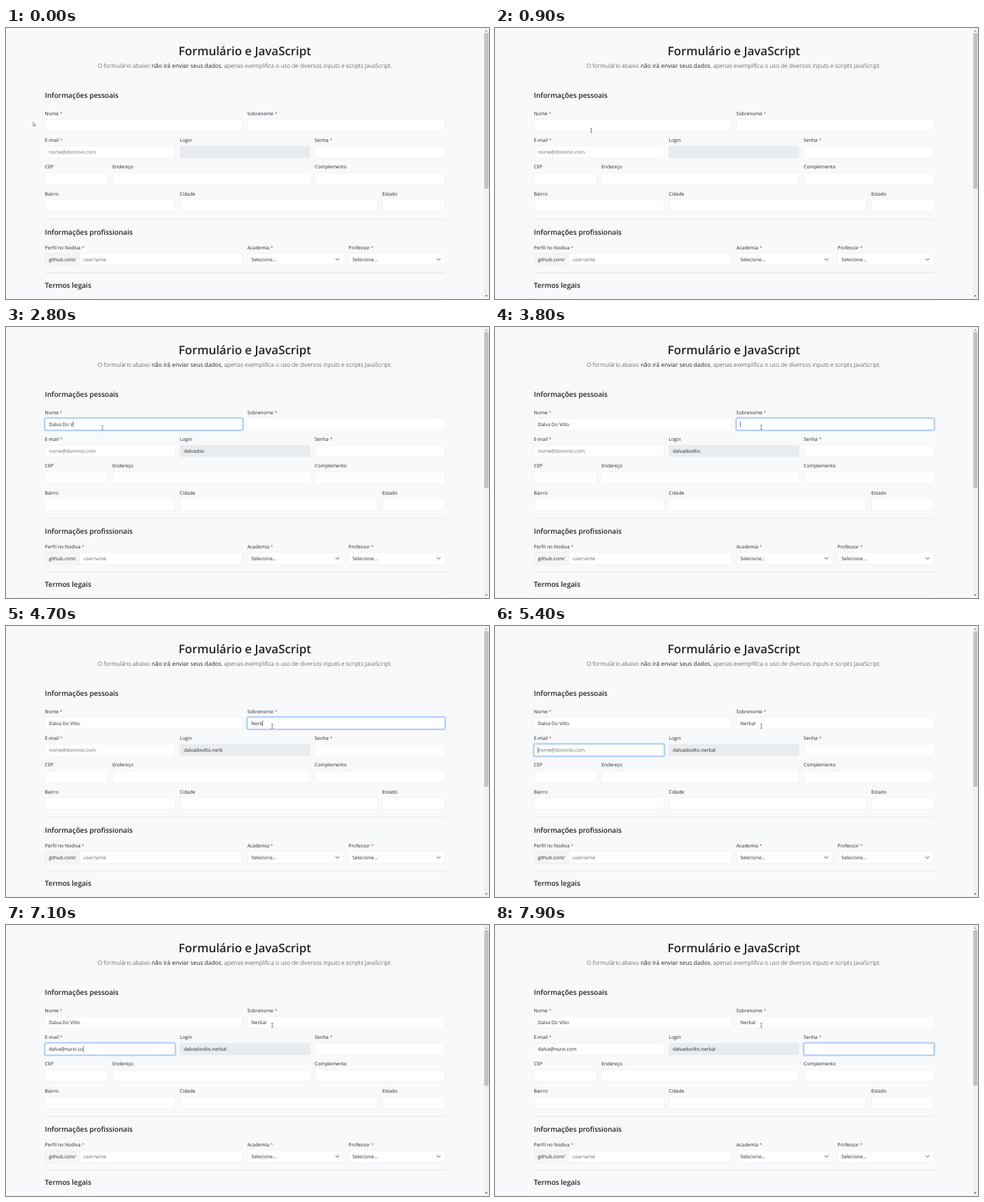
Write an HTML page that moves like this. It is 690x388 px and loops after 8 s.

```html
<!DOCTYPE html>
<html lang="pt-BR">
<head>
<meta charset="utf-8">
<title>Formulário e JavaScript</title>
<style>
  html, body { margin: 0; width: 100%; height: 100%; overflow: hidden; background: #f8f9fa; }
  svg { display: block; width: 690px; height: 388px; }
  text {
    font: 400 6.85px "Open Sans", "Noto Sans", sans-serif;
    fill: #212529; text-rendering: geometricPrecision; white-space: pre;
  }
  .title { font-size: 17px; font-weight: 600; letter-spacing: -.05px; text-anchor: middle; }
  .lead { font-size: 8.4px; font-weight: 300; text-anchor: middle; }
  .strong { font-weight: 400; }
  .section { font-size: 10.2px; font-weight: 600; letter-spacing: -.06px; }
  .hint { fill: #5f676e; }
  .star { fill: #a8656b; }
  .field { fill: #fff; stroke: #e6e9ec; stroke-width: .5; }
  .gray { fill: #e9ecef; }
  .addon { fill: #f3f5f6; }
  .ring { fill: none; stroke: #0d6efd; stroke-opacity: .25; stroke-width: 1.8; }
  .edge { fill: none; stroke: #86b7fe; stroke-width: .6; }
  .rule { stroke: #dfe2e4; stroke-width: .9; }
  .chevron { fill: none; stroke: #343a40; stroke-width: .9; stroke-linecap: round; stroke-linejoin: round; }
</style>
</head>
<body>
<svg id="stage" viewBox="0 0 690 388">
  <text class="title" x="341.3" y="39.4">Formulário e JavaScript</text>
  <text class="lead" x="341" y="57.2">O formulário abaixo <tspan class="strong">não irá enviar seus dados</tspan>, apenas exemplifica o uso de diversos inputs e scripts JavaScript.</text>
  <text class="section" x="55.6" y="99.6">Informações pessoais</text>
  <text class="section" x="55.6" y="295.5">Informações profissionais</text>
  <text class="section" x="55.6" y="372.3">Termos legais</text>
  <path class="rule" d="M55.8 274H627M55.8 350.6H627"/>
  <g id="form"></g>
  <rect class="field" x="55.8" y="386" width="571.2" height="8" rx="2"/>
  <rect y="387" width="690" height="1" fill="#eff4ec"/>
  <g id="scrollbar">
    <rect x="682.5" width="7.5" height="388" fill="#f1f1f1"/>
    <rect x="683.3" y="7.5" width="6" height="222.5" fill="#c1c1c1"/>
    <path d="M684.4 5.2L686.2 3.2L688 5.2Z" fill="#8a8a8a"/>
    <path d="M684.4 382.8L686.2 384.8L688 382.8Z" fill="#505050"/>
  </g>
  <g id="live"></g>
  <path id="arrow" d="M0 0V5.6L1.3 4.5L2.1 6.5L3 6.1L2.2 4.2H3.9Z" fill="#fff" stroke="#444" stroke-width=".5"/>
  <path id="beam" d="M-1.5 -3H-.3L0 -2.7L.3 -3H1.5M0 -2.7V2.7M-1.5 3H-.3L0 2.7L.3 3H1.5" fill="none" stroke="#444" stroke-width=".6"/>
</svg>
<script>
const LOOP = 8000, COL = 48.19, GAP = 7.05, LEFT = 55.8, H = 16.8;
const $ = id => document.getElementById(id);
const form = $('form'), live = $('live');

function add(parent, tag, attrs, text = '') {
  const el = document.createElementNS('http://www.w3.org/2000/svg', tag);
  for (const k in attrs) el.setAttribute(k, attrs[k]);
  el.textContent = text;
  parent.append(el);
  return el;
}

const label = (x, y, text, cls = '') => add(form, 'text', { x, y, class: cls }, text);

// Places a labelled box on the 12-column grid; mid is the vertical centre of the box.
function field(col, span, mid, name, { required, hint = '', gray } = {}) {
  const x = LEFT + COL * col, y = mid - H / 2, width = COL * span - GAP;
  const caption = label(x - .2, mid - 14.6, name);
  if (required) add(caption, 'tspan', { class: 'star' }, ' *');
  const box = { x, y, width, height: H, rx: 1.8 };
  add(form, 'rect', { ...box, class: gray ? 'field gray' : 'field' });
  const text = label(x + 5.5, mid + 2.5, hint, 'hint');
  return { x, y, width, mid, box, text, hint };
}

const R1 = 139.1, R2 = 177.6, R3 = 216, R4 = 254.4, R5 = 331.4;
const required = true;
const first = field(0, 6, R1, 'Nome', { required });
const last = field(6, 6, R1, 'Sobrenome', { required });
const mail = field(0, 4, R2, 'E-mail', { required, hint: 'nome@dominio.com' });
const login = field(4, 4, R2, 'Login', { gray: true });
const pass = field(8, 4, R2, 'Senha', { required });
field(0, 2, R3, 'CEP');
field(2, 6, R3, 'Endereço');
field(8, 4, R3, 'Complemento');
field(0, 4, R4, 'Bairro');
field(4, 6, R4, 'Cidade');
field(10, 2, R4, 'Estado');
const profile = field(0, 6, R5, 'Perfil no Nodiva', { required });
add(form, 'path', { class: 'field addon', d: `M105.2 ${profile.y}H57.6q-1.8 0-1.8 1.8v13.2q0 1.8 1.8 1.8H105.2Z` });
label(61.2, R5 + 2.5, 'github.com/');
label(110.8, R5 + 2.5, 'username', 'hint');
for (const [col, name] of [[6, 'Academia'], [9, 'Professor']]) {
  const f = field(col, 3, R5, name, { required, hint: 'Selecione...' });
  f.text.setAttribute('class', '');
  add(form, 'path', { class: 'chevron', d: `M${f.x + f.width - 11.4} ${R5 - 1.1}l2.3 2.3l2.3 -2.3` });
}

// Each input: focus period and the text held from each moment on.
const inputs = [
  { f: first, on: 1000, off: 3700, keys: [
    [1300, 'D'], [1600, 'Dalv'], [1700, 'Dalvs'], [2000, 'Dalv'], [2100, 'Dalva'],
    [2500, 'Dalva D'], [2600, 'Dalva Do'], [2700, 'Dalva Do '], [2800, 'Dalva Do V'],
    [2900, 'Dalva Do Vil'], [3000, 'Dalva Do Vilt'], [3100, 'Dalva Do Vilto']] },
  { f: last, on: 3700, off: 5300, keys: [[4500, 'Ne'], [4700, 'Nerb'], [5000, 'Nerbal']] },
  { f: mail, on: 5300, off: 7410, keys: [
    [5800, 'd'], [5900, 'da'], [6000, 'dal'], [6200, 'dalv'], [6300, 'dalva'],
    [6600, 'dalva@'], [6700, 'dalva@nu'], [6800, 'dalva@nurvi'],
    [7000, 'dalva@nurvi.'], [7100, 'dalva@nurvi.co'], [7300, 'dalva@nurvi.com']] },
  { f: pass, on: 7410, off: 9000, keys: [] }
];
for (const i of inputs) {
  i.glow = add(live, 'g', {});
  const { x, y, width } = i.f;
  add(i.glow, 'rect', { x: x - .9, y: y - .9, width: width + 1.8, height: H + 1.8, rx: 2.6, class: 'ring' });
  add(i.glow, 'rect', { ...i.f.box, class: 'edge' });
}
const caret = add(live, 'rect', { width: .6, height: 8.4, fill: '#212529' });

const clamp = v => Math.max(0, Math.min(1, v));
const ease = v => v * v * (3 - 2 * v);
const FADE = 90, BLINK = 480;

// Mouse stops: time, x, y
const path = [
  [0, 38.8, 134.6], [100, 38.8, 134.6], [600, 136.4, 148], [800, 136.4, 148], [900, 137.5, 147],
  [1000, 137.8, 144.4], [3300, 137.8, 144.4], [3400, 199, 138.5], [3500, 199, 138.5],
  [3800, 380.3, 143.4], [LOOP, 380.3, 143.4]
];
function mouse(t) {
  const n = Math.max(1, path.findIndex(p => p[0] > t));
  const [a, b] = [path[n - 1], path[n]];
  const k = ease(clamp((t - a[0]) / (b[0] - a[0])));
  return [a[1] + (b[1] - a[1]) * k, a[2] + (b[2] - a[2]) * k];
}

function show(f, value) {
  const text = value || f.hint;
  if (f.text.textContent !== text) f.text.textContent = text;
  f.text.setAttribute('class', value ? '' : 'hint');
}

function draw() {
  const t = (performance.now() + 10) % LOOP;
  const values = [];
  caret.style.visibility = 'hidden';
  for (const { f, on, off, keys, glow } of inputs) {
    const past = keys.filter(k => k[0] <= t);
    const [since, value] = past.length ? past[past.length - 1] : [on, ''];
    values.push(value);
    show(f, value);
    glow.style.opacity = clamp((t - on) / FADE) * (1 - clamp((t - off) / FADE));
    if (t >= on && t < off && Math.floor((t - since) / BLINK) % 2 === 0) {
      const w = value ? f.text.getComputedTextLength() : 0;
      caret.setAttribute('x', f.x + 5.5 + w);
      caret.setAttribute('y', f.mid - 4.2);
      caret.style.visibility = 'visible';
    }
  }
  const [name, surname] = values;
  show(login, name && (name.replace(/ /g, '') + '.' + surname).toLowerCase());

  const [x, y] = mouse(t);
  const over = [first, last].some(f => x > f.x && x < f.x + f.width && Math.abs(y - f.mid) < 9);
  for (const [id, on] of [['arrow', !over], ['beam', over]]) {
    $(id).setAttribute('transform', `translate(${x} ${y})`);
    $(id).style.visibility = on ? 'visible' : 'hidden';
  }
  requestAnimationFrame(draw);
}
draw();
</script>
</body>
</html>
```
